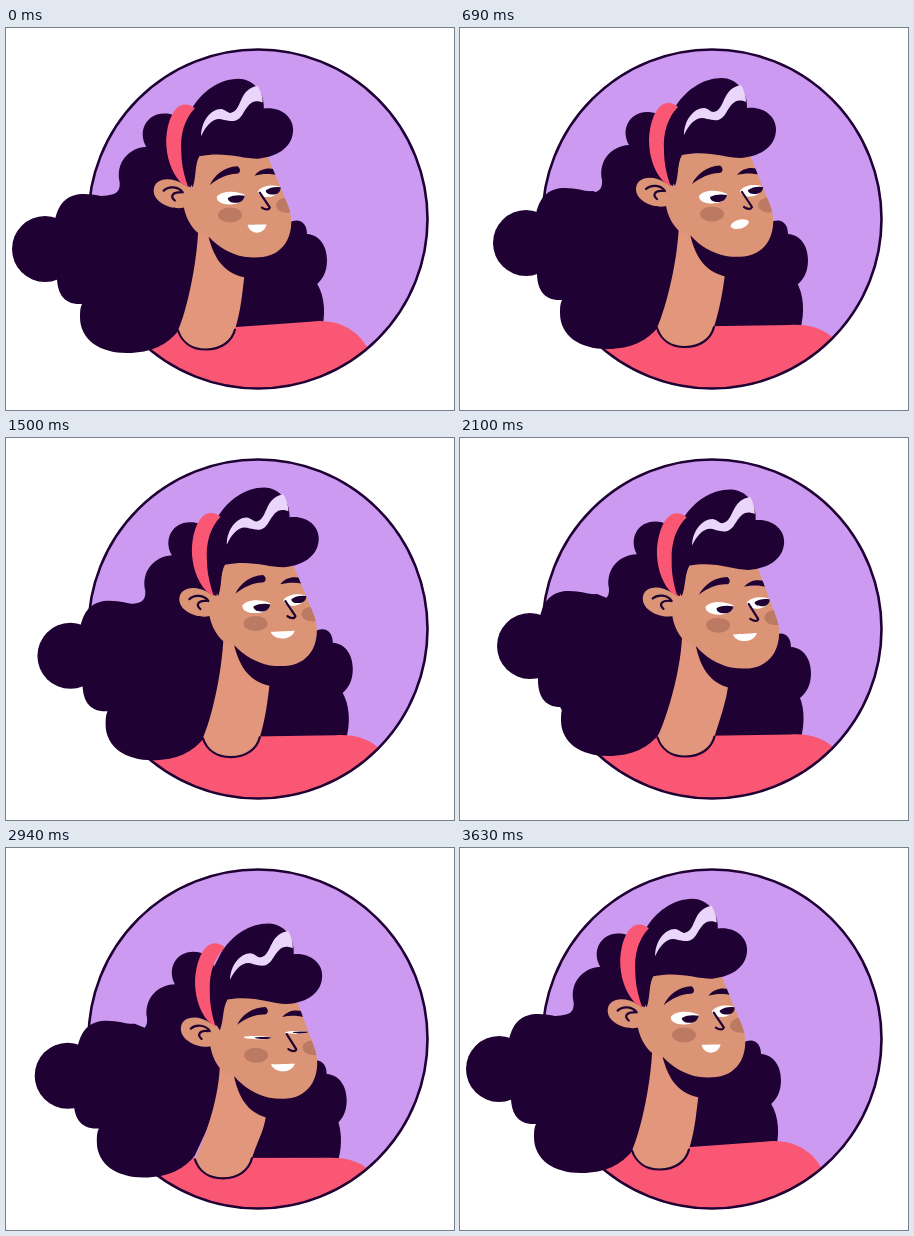
An HTML page that plays this animation: 448 px wide and 382 px high, repeating every 3.66 s.

```html
<!DOCTYPE html>
<html lang="en">
<head>
<meta charset="utf-8">
<title>Talking portrait</title>
<style>
  html, body { margin: 0; width: 100%; height: 100%; overflow: hidden; background: #fff; }
  svg { display: block; width: 100vw; height: 100vh; }
  .dark { fill: #1f0133; }
  .red { fill: #fa5774; }
  .skin { fill: #e2967b; }
  .line { fill: none; stroke: #1f0133; stroke-width: 2.2; stroke-linecap: round; stroke-linejoin: round; }
  .cheek { fill: #bd7a62; }
  .white { fill: #fff; }
</style>
</head>
<body>
<svg viewBox="0 0 448 382">
  <defs>
    <clipPath id="disc"><circle cx="252" cy="191" r="169.5"/></clipPath>
    <clipPath id="faceClip"><use href="#face"/></clipPath>
  </defs>

  <circle cx="252" cy="191" r="169.5" fill="#cc9bf1"/>

  <path id="hairRight" class="dark" d="M308 196C320 188 328 195 328 206C342 207 348 220 348 232C348 245 343 252 337 257L230 290L235 200Z"/>
  <path id="hairLow" class="dark" d="M336 253C344 266 345 285 340 302L200 312L235 230Z"/>

  <g clip-path="url(#disc)">
    <path id="body" class="red" d="M90 302L200 299L330 297C348 296 361 300 372 309C386 320 396 340 400 400L90 400Z"/>
  </g>
  <circle class="line" cx="252" cy="191" r="169.5" style="stroke-width:2.6"/>

  <path id="lump" class="dark" d="M100 285C100 308 120 321 147 321C172 321 188 312 198 299L245 198L110 200L77 240C76 262 84 273 102 272C100 276 100 280 100 285Z"/>
  <g id="bun" class="dark">
    <circle cx="66" cy="215" r="33"/>
    <path d="M76 186C80 167 90 160 105 160C118 160 126 164 133 163L200 190L190 260L80 250Z"/>
  </g>

  <path id="hairBack" class="dark" d="M112 166C135 166 143 165 142 152C138 133 151 118 169 117C160 101 170 84 187 84C194 84 198 86 204 90L226 140L222 206L130 205Z"/>
  <path id="neck" class="skin"/>
  <path id="collar" class="line"/>

  <g id="head">
    <path class="dark" d="M230 206C236 232 247 245 268 249L300 225L240 203Z"/>
    <path id="face" fill="#dc9477" d="M213 158L222 122L288 122L310 177C314 187 315 200 309 212C304 221 296 227 284 228.500C278 229 272 229 266 228C252 225 240 218 231 208L219 203C212 196 208 188 206 178C196 181 176 174 176 161C176 149 192 146 206 155Z"/>
    <path class="line" d="M186 161C191 156 201 157 205 163M203 163C195 162 192 167 197 171"/>

    <g clip-path="url(#faceClip)">
      <ellipse class="cheek" cx="252" cy="186" rx="12" ry="7.5"/>
      <ellipse class="cheek" cx="309" cy="177" rx="11" ry="7.5"/>
      <path class="dark" d="M277 147C283 140 290 139 298 141L301 147C292 145 285 145 277 147Z"/>
    </g>
    <path class="dark" d="M232 156C237 146 247 138 260 137.500C264 140 263 145 259 145C249 145 240 150 232 156Z"/>

    <g id="eyeL">
      <path class="white" d="M239 168C243 162 257 161 267 166C267 172 260 175.500 252 175.500C244 175.500 239 173 239 168Z"/>
      <path class="dark" d="M250 169C255 166 262 166 267 167C266 172 262 174 258 174C253 174 250 172 250 169Z"/>
    </g>
    <g id="eyeR">
      <path class="white" d="M280 163C284 157 294 156 302 158C303 164 297 168 291 168.500C285 169 281 167 280 163Z"/>
      <path class="dark" d="M288 162C292 159 298 158 303 159C303 164 299 166 295 166C291 166 288 165 288 162Z"/>
    </g>
    <path class="line" d="M282 164L292 179C291 182 287 181 284 179"/>
    <path id="mouth" class="white"/>

    <g id="quiff">
      <path class="dark" d="M205 100L214 81C225 62 243 50 262 50C275 50 288 62 287 80C303 78 316 88 316 101C316 117 303 128 281 130C264 130 248 122 222 127C217 135 219 148 215 158C206 145 201 122 203 105Z"/>
      <path fill="#ead6fa" d="M224 107C224 92 234 80 244 80C251 81 251 87 258 82C265 76 264 60 281 57C284 62 286 68 286 74C276 70 272 75 266 85C260 95 254 92 247 91C238 87 230 94 224 107Z"/>
    </g>
    <path class="red" d="M211 159L203 153C193 142 189 126 189 112C190 90 198 75 208 75C213 75 216 77 218 79C207 90 203 106 204 122C204 136 207 148 211 159Z"/>
  </g>
</svg>

<script>
const LOOP = 3660;
const $ = id => document.getElementById(id);

const ramp = (t, from, to) => {
  const u = Math.min(1, Math.max(0, (t - from) / (to - from)));
  return u * u * (3 - 2 * u);
};
const pulse = (t, from, peak, to) => ramp(t, from, peak) - ramp(t, peak, to);

// How far each part follows the three gestures
const parts = {
  head:  { away: [-28, 1],   nod: [1.5, 21], sway: [6, 1] },
  right: { away: [-27, 0],   nod: [-4, 20],  sway: [3, 3] },
  body:  { away: [-25, 2.5], nod: [-5, 11],  sway: [0.5, -0.5] },
  lump:  { away: [-26, 4],   nod: [-6, 8],   sway: [1, -3] },
  bun:   { away: [-27, 6],   nod: [-1, 12],  sway: [4, -7] }
};

const offset = (name, g) => [0, 1].map(axis =>
  Object.keys(g).reduce((sum, key) => sum + parts[name][key][axis] * g[key], 0));

const place = (id, [x, y], turn = 0, cx = 0, cy = 0) =>
  $(id).setAttribute('transform', `translate(${x} ${y}) rotate(${turn} ${cx} ${cy})`);

const squint = (id, y, open) =>
  $(id).setAttribute('transform', `translate(0 ${y * (1 - open)}) scale(1 ${open})`);

function drawNeck([hx, hy], [bx, by]) {
  const top = (x, y) => `${x + (hx + bx) / 2} ${y + hy} `;
  const base = (x, y) => `${x + bx} ${y + by} `;
  const bowl = `C${base(201, 312)}${base(211, 319)}${base(225, 319)}` +
    `C${base(240, 319)}${base(251, 311)}${base(254, 299)}`;
  $('neck').setAttribute('d', `M${top(219, 190)}C${top(219, 230)}${base(206, 280)}${base(197, 300)}${bowl}` +
    `C${base(260, 280)}${top(263, 262)}${top(265, 246)}L${top(270, 205)}Z`);
  $('collar').setAttribute('d', `M${base(197, 300)}${bowl}`);
}

function drawMouth(t, sway) {
  const round = pulse(t, 200, 450, 1020);
  const flat = pulse(t, 450, 1020, 1500);
  const grin = ramp(t, 1020, 1500) - ramp(t, 2900, 3230);
  const w = 9.5 + 2.5 * grin, c = w * 0.75;
  const rise = -8 * round - 2 * flat;
  const drop = 10.7 - 2.7 * round - 7.3 * flat - grin;
  $('mouth').setAttribute('d', `M${-w} 0C${-c} ${rise} ${c} ${rise} ${w} 0C${c} ${drop} ${-c} ${drop} ${-w} 0Z`);
  place('mouth', [279 + 2 * flat, 196 - 2 * grin], -20 * round - 6 * flat - 3 * grin - 2 * sway);
}

function draw(t) {
  const away = 1 - ramp(t, 260, 580) + ramp(t, 2860, 3230);
  const nod = pulse(t, 140, 370, 600) + pulse(t, 2720, 2940, 3210);
  const sway = 1.4 * ramp(t, 1500, 2100) - 0.4 * ramp(t, 1020, 1500) - ramp(t, 2720, 2950);
  const gesture = { away, nod, sway };

  const [head, right, body, lump, bun] = Object.keys(parts).map(name => offset(name, gesture));
  const turn = -0.6 * away + 1.5 * nod + 1.4 * sway;
  place('head', head, turn, 245, 190);
  place('hairBack', head, turn, 245, 190);
  place('quiff', [0, 4 * nod]);
  place('hairRight', right);
  place('hairLow', body);
  place('body', body, 1.2 * nod - 3.2 * away, 225, 310);
  place('lump', lump);
  place('bun', bun);
  drawNeck(head, body);
  drawMouth(t, sway);

  const open = 1 - 0.75 * pulse(t, 2780, 2940, 3080);
  squint('eyeL', 168, open);
  squint('eyeR', 162, open);
}

const start = performance.now();
function tick() {
  draw((performance.now() - start) % LOOP);
  requestAnimationFrame(tick);
}
tick();
</script>
</body>
</html>
```
